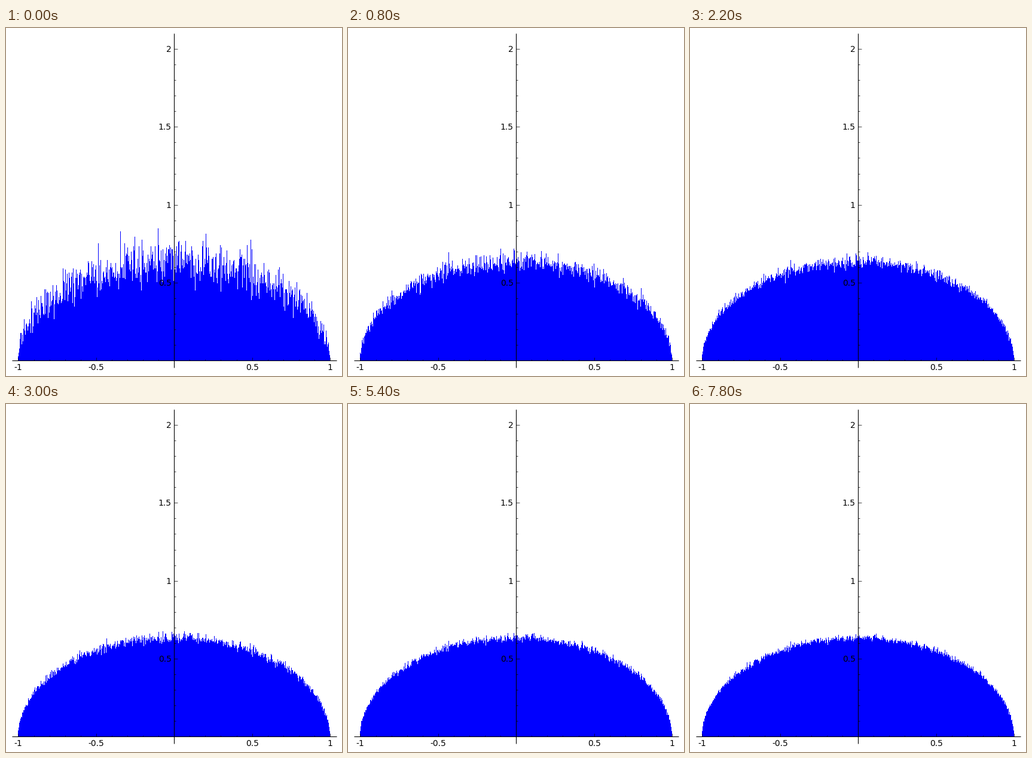
These frames come from a looping animation (562x582 px, 8 s). A matplotlib script:

```python
import numpy as np
import matplotlib.pyplot as plt
from matplotlib.animation import FuncAnimation

W, H, DPI = 562, 582, 100
X0, Y0 = 281.2, 556.4        # plot origin in pixels
UNIT = 260.75                # pixels per data unit
LEFT, BARS = 20, 522         # one histogram bar per pixel column
FRAMES, INTERVAL = 40, 200
STEP = 72                    # samples a central bar gains per frame


def px(x):
    return X0 + UNIT * x


def py(y):
    return Y0 - UNIT * y


def histograms():
    """Running histograms converging to the semicircle density."""
    rng = np.random.default_rng(12)
    centers = (np.arange(BARS) + 0.5) * 2 / BARS - 1
    rate = STEP * np.sqrt(1 - centers**2)
    counts = np.cumsum(rng.poisson(rate, (FRAMES, BARS)), axis=0)
    total = STEP * np.arange(1, FRAMES + 1)
    return counts / total[:, None] * 2 / np.pi


tops = np.round(py(histograms()))

fig = plt.figure(figsize=(W / DPI, H / DPI), dpi=DPI, facecolor="white")
ax = fig.add_axes([0, 0, 1, 1])
ax.set_xlim(0, W)
ax.set_ylim(H, 0)
ax.axis("off")

edges = LEFT + np.arange(BARS + 1)
bars = ax.stairs(tops[0], edges, baseline=556, fill=True,
                 color="#0000ff", linewidth=0, antialiased=False)


def line(xs, ys, width):
    ax.plot(xs, ys, color="black", lw=width, solid_capstyle="butt", zorder=3)


def label(x, y, text, align):
    ax.text(x, y, text, family="DejaVu Sans", size=10, color="black",
            ha=align, va="baseline", zorder=4)


def tick_size(i):
    return 5.6 if i % 5 == 0 else 2.8


line([10, 553], [Y0, Y0], 0.8)
line([X0, X0], [9, 568], 0.8)

for i in range(-10, 11):
    line([px(i / 10)] * 2, [Y0, Y0 - tick_size(i)], 0.5)
for i in range(1, 21):
    line([X0, X0 + tick_size(i)], [py(i / 10)] * 2, 0.5)

for v in (-1, -0.5, 0.5, 1):
    label(px(v), 572.5, f"{v:g}", "center")
for v in (0.5, 1, 1.5, 2):
    label(276.5, py(v) + 5, f"{v:g}", "right")


def draw(frame):
    bars.set_data(tops[frame])
    return (bars,)


anim = FuncAnimation(fig, draw, frames=FRAMES, interval=INTERVAL,
                     repeat=True, repeat_delay=0)
plt.show()
```
